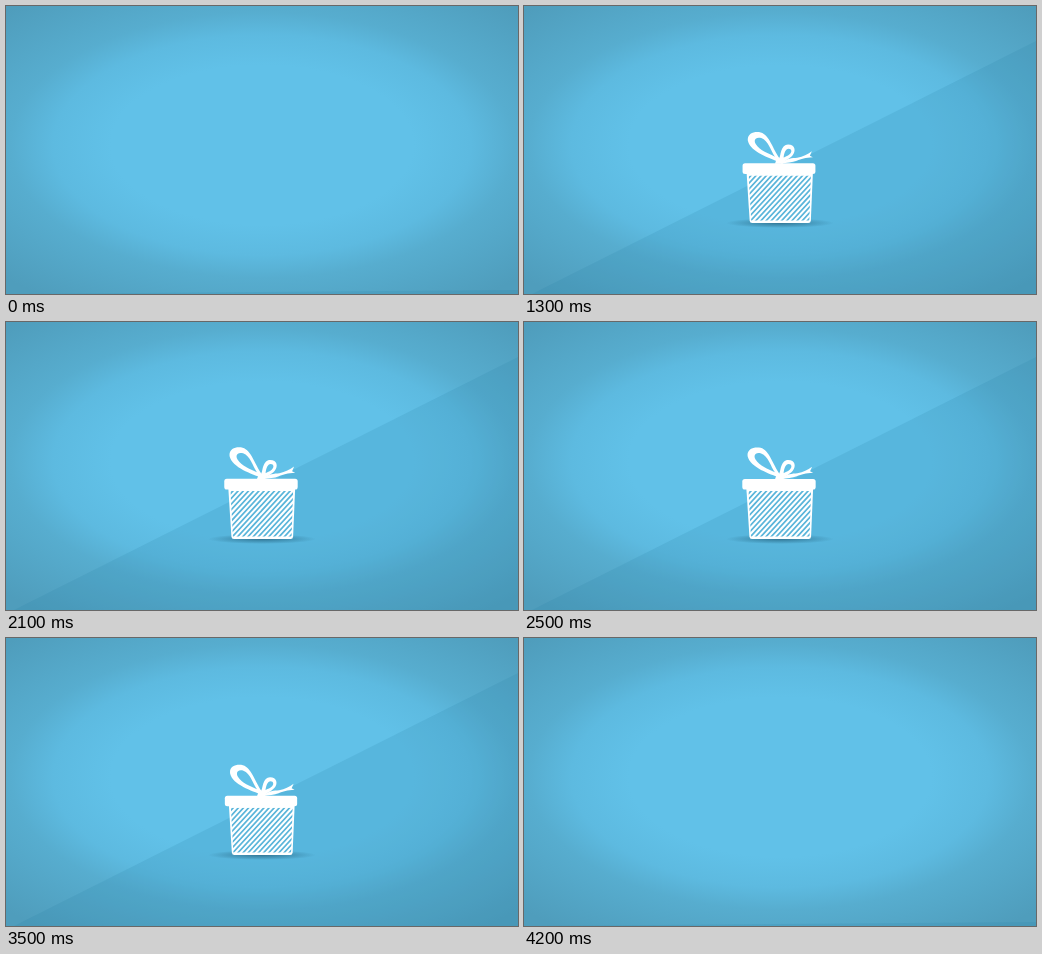
Write an HTML page that moves like this. It is 512x288 px and loops after 4400 ms.

```html
<!DOCTYPE html>
<html lang="en">
<head>
<meta charset="utf-8">
<title>Gift box</title>
<style>
  html, body { margin: 0; width: 100%; height: 100%; overflow: hidden; background: #61c1e8; }
  svg { display: block; width: 100vw; height: 100vh; }
</style>
</head>
<body>
<svg viewBox="0 0 512 288" preserveAspectRatio="none">
  <defs>
    <radialGradient id="sky" gradientUnits="userSpaceOnUse" cx="0" cy="0" r="1"
      gradientTransform="translate(256 139) scale(360 190)">
      <stop offset=".42" stop-color="#61c1e8"/>
      <stop offset=".58" stop-color="#5dbae0"/>
      <stop offset=".7" stop-color="#57adcf"/>
      <stop offset="1" stop-color="#4f9dbc"/>
    </radialGradient>
    <radialGradient id="soft">
      <stop offset="0" stop-color="#24607c" stop-opacity=".75"/>
      <stop offset=".55" stop-color="#2c6d8b" stop-opacity=".4"/>
      <stop offset="1" stop-color="#2c6d8b" stop-opacity="0"/>
    </radialGradient>
    <clipPath id="inside"><path d="M225 170H286.500L285 214.500H227.500Z"/></clipPath>
  </defs>
  <rect width="512" height="288" fill="url(#sky)"/>
  <path id="shade" fill="#287ba2" fill-opacity=".16"/>
  <ellipse id="shadow" cx="256" cy="217" rx="54" ry="5" fill="url(#soft)"/>
  <g id="gift" fill="#fff">
    <path d="M223 167.500H288.500L286.500 214.500Q286.300 217 284 217H228.500Q226.200 217 226 214.500Z"/>
    <path id="stripes" clip-path="url(#inside)" fill="none" stroke="#5ab5da" stroke-width="1.700"/>
    <rect x="219" y="158" width="72" height="10.500" rx="2.500"/>
    <g id="knot"><path d="M251 158.500L253 153L254.500 155L256.500 149.500L257.500 153L259.500 152L259 158.500Z"/></g>
    <g id="loop">
      <path fill-rule="evenodd" d="M256 157C246 153 227 147 224.300 136C223 129 230 126 237 127.500C246 130 249 145 257 155Z
        M251 151.500C247 146 244.500 135.500 237.500 133C232 131.500 229.500 135 232 139C236 145.500 244 148 251 151.500Z"/>
    </g>
    <g id="curl">
      <path fill-rule="evenodd" d="M255.500 157C256 150 257 139.500 264 139.500C271 139.500 272 146 268.500 150C265 154 261 155 258.500 157.500Z
        M259.500 152.500C260 148 261.500 143.500 264.500 143.500C267.800 143.500 268 147 265.500 149C263.500 151 261 151 259.500 152.500Z"/>
    </g>
    <g id="tail">
      <path d="M257 157.500C263 153 268 153 273 152.500C279 151.500 283 149 287.500 146L285.500 150.500L288.500 152C281 152.500 277 153.500 272.500 155.500C268 157.500 263 157 257 158.500Z"/>
    </g>
  </g>
</svg>
<script>
  const LOOP = 4400, STEP = 100;
  const el = id => document.getElementById(id);
  const clamp = u => Math.max(0, Math.min(1, u));
  const span = (t, a, b) => clamp((t - a) / (b - a));
  const smooth = u => u * u * (3 - 2 * u);
  const backOut = u => 1 + 2.2 * (u - 1) ** 3 + 1.2 * (u - 1) ** 2;

  function scaleAt(id, x, y, k, turn = 0) {
    const node = el(id);
    node.style.display = k > 0.01 ? "" : "none";
    node.setAttribute("transform",
      `translate(${x} ${y}) rotate(${turn}) scale(${k}) translate(${-x} ${-y})`);
  }

  let lines = "";
  for (let x = 173; x < 290; x += 5.1) lines += `M${x} 218L${x + 46} 168`;
  el("stripes").setAttribute("d", lines);

  function draw(now) {
    const t = Math.floor((now % LOOP) / STEP) * STEP;
    const s = Math.min(t, LOOP - t); // the exit mirrors the entrance

    const rise = smooth(span(s, 200, 780));
    el("shade").setAttribute("d", `M8 288L512 ${284 - 249 * rise}V288Z`);

    const grow = span(s, 220, 570);
    const breath = 0.02 * Math.sin(Math.PI * span(t, 700, 3700));
    scaleAt("gift", 256, 217, grow > 0 ? backOut(grow) + breath : 0);
    scaleAt("shadow", 256, 217, smooth(grow));

    const settle = smooth(span(s, 700, 900));
    scaleAt("knot", 256, 158, span(s, 500, 600));
    scaleAt("loop", 256, 157, smooth(span(s, 540, 690)), 2 * settle - 2);
    scaleAt("curl", 257, 157, smooth(span(s, 700, 860)));
    scaleAt("tail", 257, 158, smooth(span(s, 740, 900)));
  }

  const start = performance.now();
  function tick() {
    draw(performance.now() - start);
    requestAnimationFrame(tick);
  }
  tick();
</script>
</body>
</html>
```
